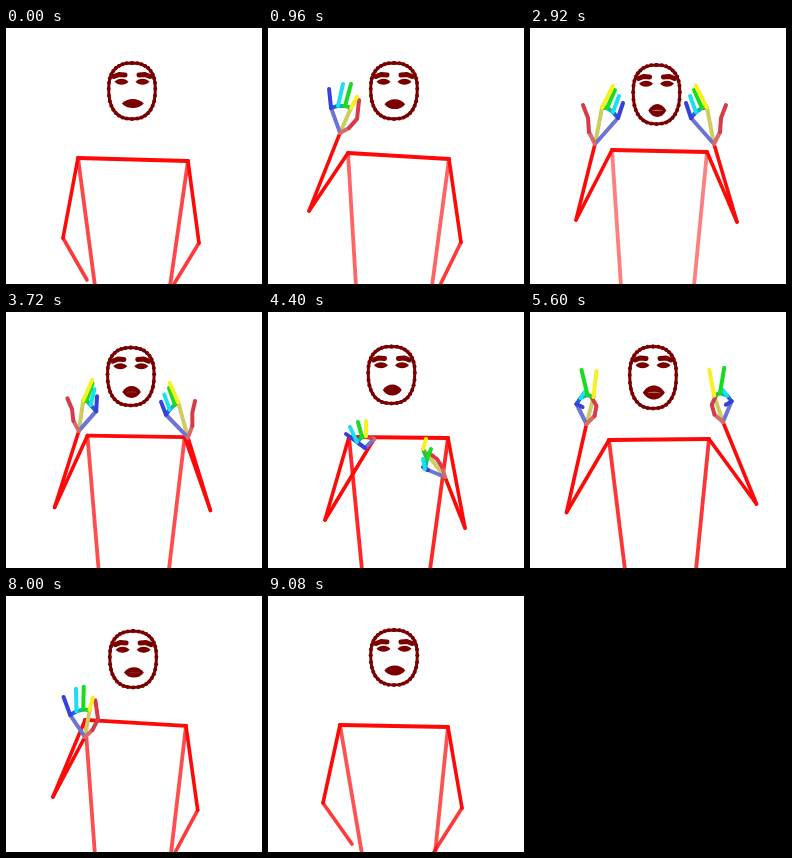
An HTML page with a canvas for the animation above (9120 ms loop, 256x256 px).

```html
<!DOCTYPE html>
<html lang="en">
<head>
<meta charset="utf-8">
<title>Signing skeleton</title>
<style>
  html, body { margin: 0; height: 100%; overflow: hidden; background: #fff; }
  canvas { display: block; width: 100vmin; height: 100vmin; }
</style>
</head>
<body>
<canvas></canvas>
<script>
const LOOP = 9120, STEP = 40, DARK = '#7a0000', RED = '#ff0808';
const canvas = document.querySelector('canvas');
const ctx = canvas.getContext('2d');

// Offsets from the wrist: base and tip of pinky, ring, middle, index; then three thumb joints.
const SHAPES = {
  wave:  [-9,-25,-11,-44,  -2,-27,3,-49,    5,-27,11,-49,   11,-25,17,-36,  9,-5, 17,-14, 19,-33],
  palm:  [23,-26,28,-41,   18,-32,24,-48,   12,-36,20,-54,  7,-36,18,-58,   -6,-12, -7,-26, -12,-39],
  chest: [-9,9,-28,-5,     -17,3,-24,-12,   -12,-2,-16,-17, -8,-3,-8,-18,   -3,-1, -6,-2, -9,-2],
  fold:  [17,-7,22,-10,    20,-8,22,-18,    18,-18,14,-28,  22,-28,19,-38,  3,-10, 8,-18, 16,-24],
  two:   [-10,-20,-4,-17,  -6,-26,-2,-32,   1,-29,-5,-54,   7,-27,10,-53,   8,-8, 10,-18, 5,-27]
};

// time, left shoulder x y, right shoulder x y, hip xs, torso opacity
const BODY = [
  [0,    72, 130, 182, 133, 89, 164, .75],
  [880,  80, 125, 181, 131, 88, 164, .63],
  [2160, 81, 124, 180, 130, 88, 164, .6],
  [2920, 82, 122, 177, 124, 91, 164, .52],
  [4400, 81, 125, 180, 126, 94, 162, .88],
  [5600, 79, 128, 179, 127, 95, 166, .82],
  [6760, 80, 123, 180, 129, 88, 164, .72],
  [8320, 79, 124, 180, 130, 89, 165, .72],
  [9080, 72, 129, 180, 131, 94, 167, .7]
];

// time, elbow x y, wrist x y, hand turn in degrees, hand shape
const LEFT_ARM = [
  [0,    57, 210, 81, 252, 0, 'wave'],
  [160,  56, 209, 81, 250, 0, 'wave'],
  [800,  41, 183, 72, 105, 0, 'wave'],
  [2160, 42, 181, 73, 103, 0, 'wave'],
  [2600, 23, 184, 52, 112, 0, 'palm'],
  [2760, 28, 187, 56, 113, 0, 'palm'],
  [2920, 46, 192, 65, 116, 0, 'palm'],
  [3560, 47, 193, 66, 117, 0, 'palm'],
  [4160, 56, 207, 105, 128, 0, 'chest'],
  [4400, 57, 208, 106, 127, 0, 'chest'],
  [4960, 37, 200, 56, 112, 0, 'two'],
  [6240, 36, 201, 57, 112, 0, 'two'],
  [6720, 46, 201, 78, 141, -14, 'wave'],
  [8280, 47, 201, 79, 141, -14, 'wave'],
  [8840, 55, 207, 84, 248, 0, 'wave'],
  [9080, 55, 207, 84, 248, 0, 'wave']
];
const RIGHT_ARM = [
  [0,    193, 215, 168, 256, 0, 'palm'],
  [2160, 193, 213, 179, 256, 0, 'palm'],
  [2600, 227, 187, 197, 113, 0, 'palm'],
  [2760, 222, 189, 193, 114, 0, 'palm'],
  [2920, 207, 194, 184, 116, 0, 'palm'],
  [3560, 206, 195, 183, 117, 0, 'palm'],
  [4160, 197, 215, 177, 165, 0, 'fold'],
  [4400, 197, 216, 177, 165, 0, 'fold'],
  [4960, 226, 192, 193, 110, 4, 'two'],
  [6240, 227, 192, 193, 110, 4, 'two'],
  [6720, 189, 215, 172, 256, 0, 'two'],
  [8320, 192, 214, 169, 256, 0, 'two'],
  [9080, 194, 212, 166, 256, 0, 'two']
];

// time, centre x, top, height, mouth y, mouth width, mouth height, mouth opening
const FACE = [
  [0,    126, 35, 56, 75.5, 22, 9, 0],
  [2160, 126, 35, 56, 77, 19, 11, .5],
  [2920, 126.5, 37, 59, 82.5, 18, 13, 1],
  [4400, 123.5, 34.5, 57, 78, 19, 11, 0],
  [5000, 123, 31, 61, 77, 20, 12, .5],
  [5600, 123, 34.5, 62, 80.5, 22, 14, 1],
  [6440, 126, 32, 62, 77, 20, 12, 1],
  [6760, 128, 36, 59, 79.5, 20, 13, 3],
  [8320, 127, 35, 56, 76, 20, 10, 0],
  [9080, 126, 34, 55, 74.5, 21, 10, 0]
];

const mix = (a, b, k) => a + (b - a) * k;

function sample(track, time) {
  const next = Math.max(1, track.findIndex(key => key[0] > time));
  const i = time >= track.at(-1)[0] ? track.length - 1 : next;
  const a = track[i - 1], b = track[i];
  const u = Math.min(1, (time - a[0]) / (b[0] - a[0]));
  const k = u * u * (3 - 2 * u);
  return a.slice(1).map((v, n) => typeof v === 'string'
    ? SHAPES[v].map((p, m) => mix(p, SHAPES[b[n + 1]][m], k))
    : mix(v, b[n + 1], k));
}

function line(color, width, alpha, ...points) {
  ctx.globalAlpha = alpha;
  ctx.strokeStyle = color;
  ctx.lineWidth = width;
  ctx.beginPath();
  points.forEach(p => ctx.lineTo(...p));
  ctx.stroke();
  ctx.globalAlpha = 1;
}

function lens(x, y, w, h, color) {
  ctx.fillStyle = color;
  ctx.beginPath();
  ctx.moveTo(x - w / 2, y);
  ctx.bezierCurveTo(x - w / 4, y - h * .67, x + w / 4, y - h * .67, x + w / 2, y);
  ctx.bezierCurveTo(x + w / 4, y + h * .67, x - w / 4, y + h * .67, x - w / 2, y);
  ctx.fill();
}

function drawFace([x, top, height, mouthY, mouthW, mouthH, opening]) {
  const bend = v => Math.sign(v) * Math.abs(v) ** .83;
  const outline = Array.from({ length: 37 }, (_, i) => {
    const angle = i * Math.PI / 18;
    return [x + 23.3 * bend(Math.sin(angle)), top + height * (.46 - (Math.cos(angle) > 0 ? .46 : .54) * bend(Math.cos(angle)))];
  });
  line(DARK, 3, 1, ...outline);
  ctx.fillStyle = DARK;
  for (const [px, py] of outline) {
    ctx.beginPath();
    ctx.arc(px, py, 2, 0, 7);
    ctx.fill();
  }
  for (const side of [-1, 1]) {
    const at = (dx, dy) => [x + side * dx, top + dy];
    line(DARK, 5, 1, at(18, 13.5), at(13, 11.5), at(7, 12));
    lens(...at(10.5, 18.7), 14, 6, DARK);
  }
  lens(x + .8, mouthY, mouthW, mouthH, DARK);
  if (opening > .3) lens(x + .8, mouthY, mouthW * .6, opening * 1.3, opening > 1.5 ? '#fff' : '#b46464');
}

function drawHand(wx, wy, degrees, shape, mirror) {
  const turn = degrees * Math.PI / 180, cos = Math.cos(turn), sin = Math.sin(turn);
  const joint = i => {
    const x = shape[2 * i], y = shape[2 * i + 1];
    return [wx + mirror * (x * cos - y * sin), wy + x * sin + y * cos];
  };
  const wrist = [wx, wy];
  line('#cccc60', 4, 1, wrist, joint(6));
  line('#6c74d4', 4, 1, wrist, joint(0));
  line('#d96a6a', 4, 1, wrist, joint(8));
  line('#d63c48', 4, 1, joint(8), joint(9), joint(10));
  line('#2060d8', 4, 1, joint(0), joint(2));
  line('#10b4b0', 4, 1, joint(2), joint(4));
  line('#28c040', 4, 1, joint(4), joint(6));
  ['#3840dc', '#18e0f0', '#18dc20', '#f8f020'].forEach((color, i) =>
    line(color, 4, 1, joint(2 * i), joint(2 * i + 1)));
}

function drawArm(shoulder, [ex, ey, wx, wy, turn, shape], mirror) {
  const lowered = wy > 225;
  line(RED, 3.6, 1, shoulder, [ex, ey]);
  line(RED, 3.6, lowered ? .8 : 1, [ex, ey], [wx, wy]);
  if (!lowered) drawHand(wx, wy, turn, shape, mirror);
}

function draw(time) {
  const size = Math.min(innerWidth, innerHeight) * devicePixelRatio;
  if (canvas.width !== Math.round(size)) canvas.width = canvas.height = Math.round(size);
  ctx.setTransform(size / 256, 0, 0, size / 256, 0, 0);
  ctx.fillStyle = '#fff';
  ctx.fillRect(0, 0, 256, 256);
  ctx.lineCap = ctx.lineJoin = 'round';

  const [lx, ly, rx, ry, hipL, hipR, alpha] = sample(BODY, time);
  drawFace(sample(FACE, time));
  line(RED, 3.8, alpha, [lx, ly], [hipL, 258]);
  line(RED, 3.8, alpha, [rx, ry], [hipR, 258]);
  line(RED, 3.8, 1, [lx, ly], [rx, ry]);
  drawArm([lx, ly], sample(LEFT_ARM, time), 1);
  drawArm([rx, ry], sample(RIGHT_ARM, time), -1);
}

const start = performance.now();
function tick() {
  const elapsed = (performance.now() - start) % LOOP;
  draw(elapsed < 2 * STEP ? 0 : Math.floor(elapsed / STEP) * STEP);
  requestAnimationFrame(tick);
}
tick();
</script>
</body>
</html>
```
